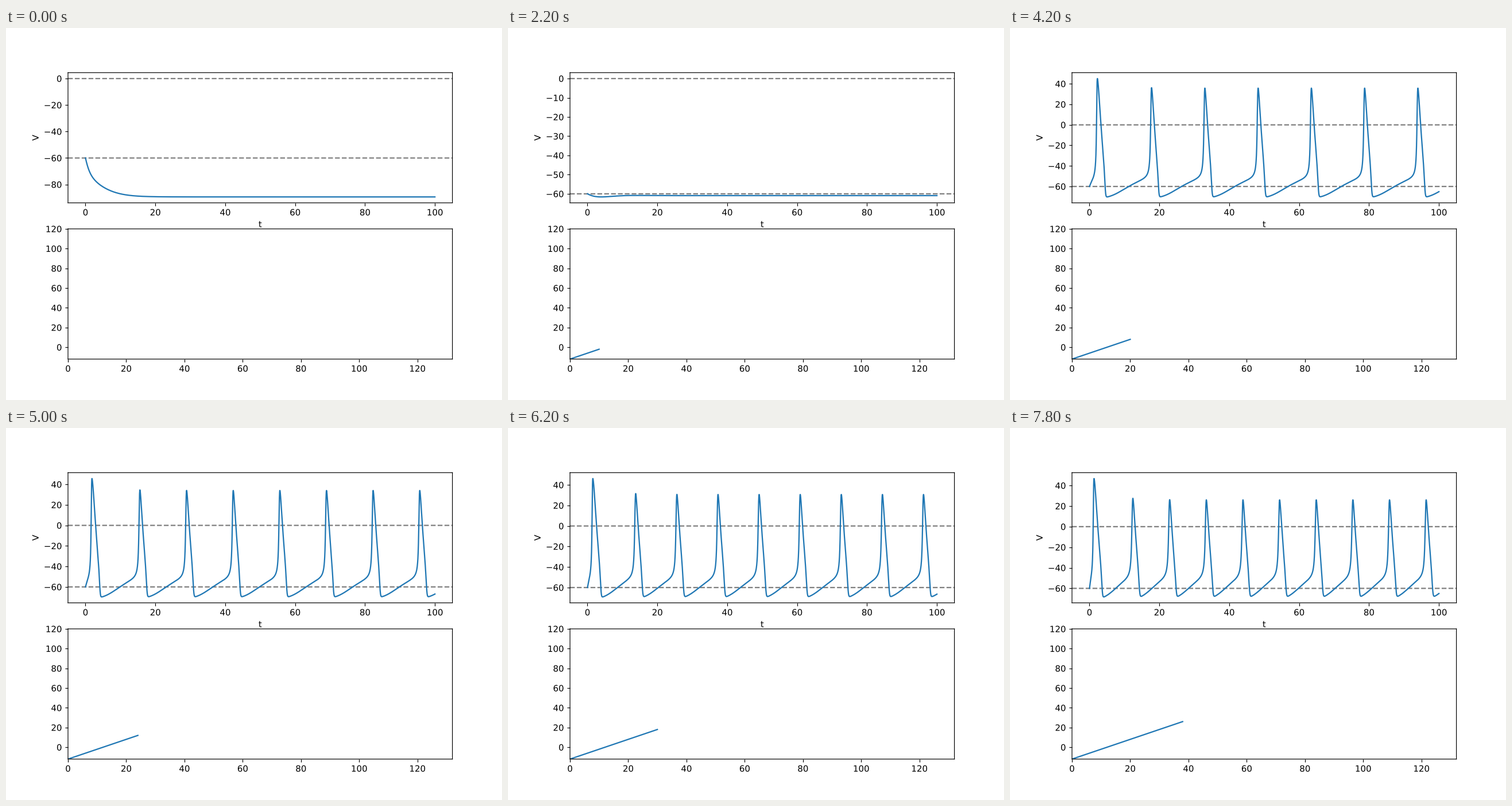
Animation, 864 px wide and 648 px high, one loop 8 s. Source, as a matplotlib script:

```python
import numpy as np
import matplotlib.pyplot as plt
from matplotlib.animation import FuncAnimation
from matplotlib.patheffects import Normal

FRAMES, INTERVAL = 40, 200
REST = -60.0
T_END, DT = 100.0, 0.02
I_START = -12

# Lines, ticks and glyphs keep their exact sub-pixel places.
plt.rcParams.update({"path.snap": False,
                     "path.effects": [Normal()],
                     "text.hinting": "none"})


def ratio(x):
    """x / (exp(x) - 1), kept finite at zero."""
    x = x + 1e-12
    return x / np.expm1(x)


def rates(v):
    """Opening and closing rates of the m, h and n gates."""
    opening = np.array([ratio((25 - v) / 10),
                        0.07 * np.exp(-v / 20),
                        0.1 * ratio((10 - v) / 10)])
    closing = np.array([4 * np.exp(-v / 18),
                        1 / (np.exp((30 - v) / 10) + 1),
                        0.125 * np.exp(-v / 80)])
    return opening, closing


def slope(state, current):
    v, gates = state[0], state[1:]
    m, h, n = gates
    opening, closing = rates(v)
    dv = (current - 120 * m**3 * h * (v - 115)
          - 36 * n**4 * (v + 12) - 0.3 * (v - 10.6))
    return np.vstack([dv, opening * (1 - gates) - closing * gates])


def simulate(current):
    """Membrane voltage over time, one column per injected current (RK4)."""
    v = np.zeros(len(current))
    opening, closing = rates(v)
    state = np.vstack([v, opening / (opening + closing)])
    steps = int(round(T_END / DT))
    volts = np.empty((steps + 1, len(current)))
    volts[0] = v
    for i in range(steps):
        k1 = slope(state, current)
        k2 = slope(state + DT / 2 * k1, current)
        k3 = slope(state + DT / 2 * k2, current)
        k4 = slope(state + DT * k3, current)
        state = state + DT / 6 * (k1 + 2 * k2 + 2 * k3 + k4)
        volts[i + 1] = state[0]
    return np.linspace(0, T_END, steps + 1), volts + REST


steps = np.arange(FRAMES)
currents = I_START + steps
time, volts = simulate(currents.astype(float))

fig, (ax_v, ax_i) = plt.subplots(2, 1, figsize=(8, 6), dpi=108)

for level in (0, REST):
    ax_v.axhline(level, color="gray", linestyle="--")
trace, = ax_v.plot([], [], color="C0")
ax_v.set_xlim(-5, 105)
ax_v.set_xlabel("t")
ax_v.set_ylabel("V")

ramp, = ax_i.plot([], [], color="C0")
ax_i.set_xlim(0, 132)
ax_i.set_ylim(-12, 120)


def update(k):
    v = volts[:, k]
    trace.set_data(time, v)
    low, high = min(v.min(), REST), max(v.max(), 0)
    pad = 0.05 * (high - low)
    ax_v.set_ylim(low - pad, high + pad)
    ramp.set_data(steps[:k], currents[:k])
    return trace, ramp


anim = FuncAnimation(fig, update, frames=FRAMES, interval=INTERVAL,
                     init_func=lambda: update(0), repeat=True, repeat_delay=0)
plt.show()
```
